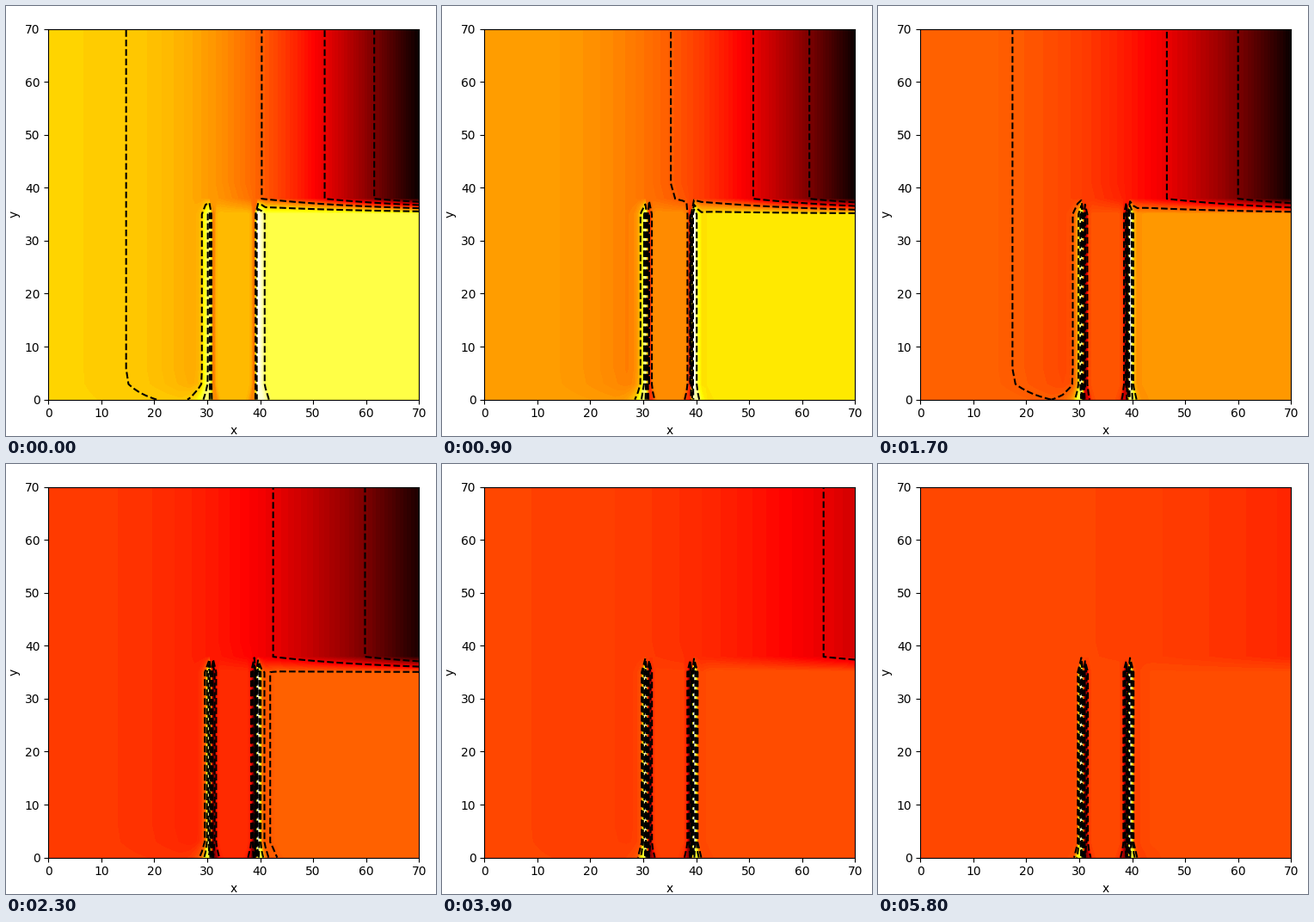
A matplotlib script that plays this animation: 500x500 px, repeating every 5.9 s.

```python
import numpy as np
import matplotlib.pyplot as plt
from matplotlib.animation import FuncAnimation

FRAMES, INTERVAL = 59, 100
SIZE = 70
x = np.linspace(0, SIZE, 100)
y = np.linspace(0, SIZE, 25)
s = x / SIZE
TOP = 13                     # first row above the two walls
WALL_A, WALL_B = 43, 55      # first column of each two-column wall
BANDS = np.linspace(0, 1, 100)
LINES = np.arange(1, 6) / 6


def fade(t, span):
    return np.exp(-t / span)


def field(t):
    """Levels relative to the undisturbed left side, scaled to 0..1."""
    drop = fade(t, 16.67)                  # deficit at the right edge
    crest = .305 + .17 * fade(t, 11)       # highest value, at the right wall
    dip = .262 + .0002 * t                 # lowest value beside the walls
    basin = .205 * fade(t, 13)
    gap = -.05 * fade(t, 16)

    bend = .33 * fade(t, 8)
    power = 2.6 + .2 * fade(t, 8)
    fall = drop * ((1 + bend) * s ** power - bend * s ** 5)

    def below(share):
        row = -share * fall
        row[WALL_A + 1:WALL_B + 1] = gap
        row[WALL_B + 1:] = basin
        return row

    base = below(1)
    row = base.copy()
    row[WALL_A:WALL_A + 2] = .29, -dip
    row[WALL_B:WALL_B + 2] = -dip, crest
    row[WALL_A + 2] -= .015
    row[WALL_B - 1] -= .02
    row[WALL_B + 2] += .15 * fade(t, 9)
    for k in range(4):
        row[WALL_A - 1 - k] += .26 * drop * .35 ** k
        row[WALL_B + 3 + k] -= .012 * .5 ** k
    spike = row - base

    # the disturbance spreads sideways along the floor
    centre = np.where(x < 35, 30.75, 39.25)
    wide = np.interp(centre + (x - centre) / 1.5, x, spike)

    z = np.tile(-fall, (len(y), 1))
    z[:TOP] = row
    z[0] = below(.4) + wide
    z[1] = below(.92) + spike
    inner = slice(WALL_A + 2, WALL_B)
    z[TOP, inner] += .08 * (gap - z[TOP, inner])

    low = max(drop, dip)
    return np.clip((z + low) / (crest + low), 0, 1)


fig = plt.figure(figsize=(5, 5), dpi=100)
ax = fig.add_axes([.0985, .0848, .862, .862])


def draw(i):
    ax.clear()
    z = field(i)
    ax.contourf(x, y, z, levels=BANDS, cmap="hot", vmin=0, vmax=1)
    ax.contour(x, y, z, levels=LINES, colors="k", linestyles="dashed")
    ax.set(xlim=(0, SIZE), ylim=(0, SIZE), xlabel="x", ylabel="y")
    return []


anim = FuncAnimation(fig, draw, frames=FRAMES, interval=INTERVAL,
                     init_func=lambda: draw(0), repeat=True, repeat_delay=0)
plt.show()
```
